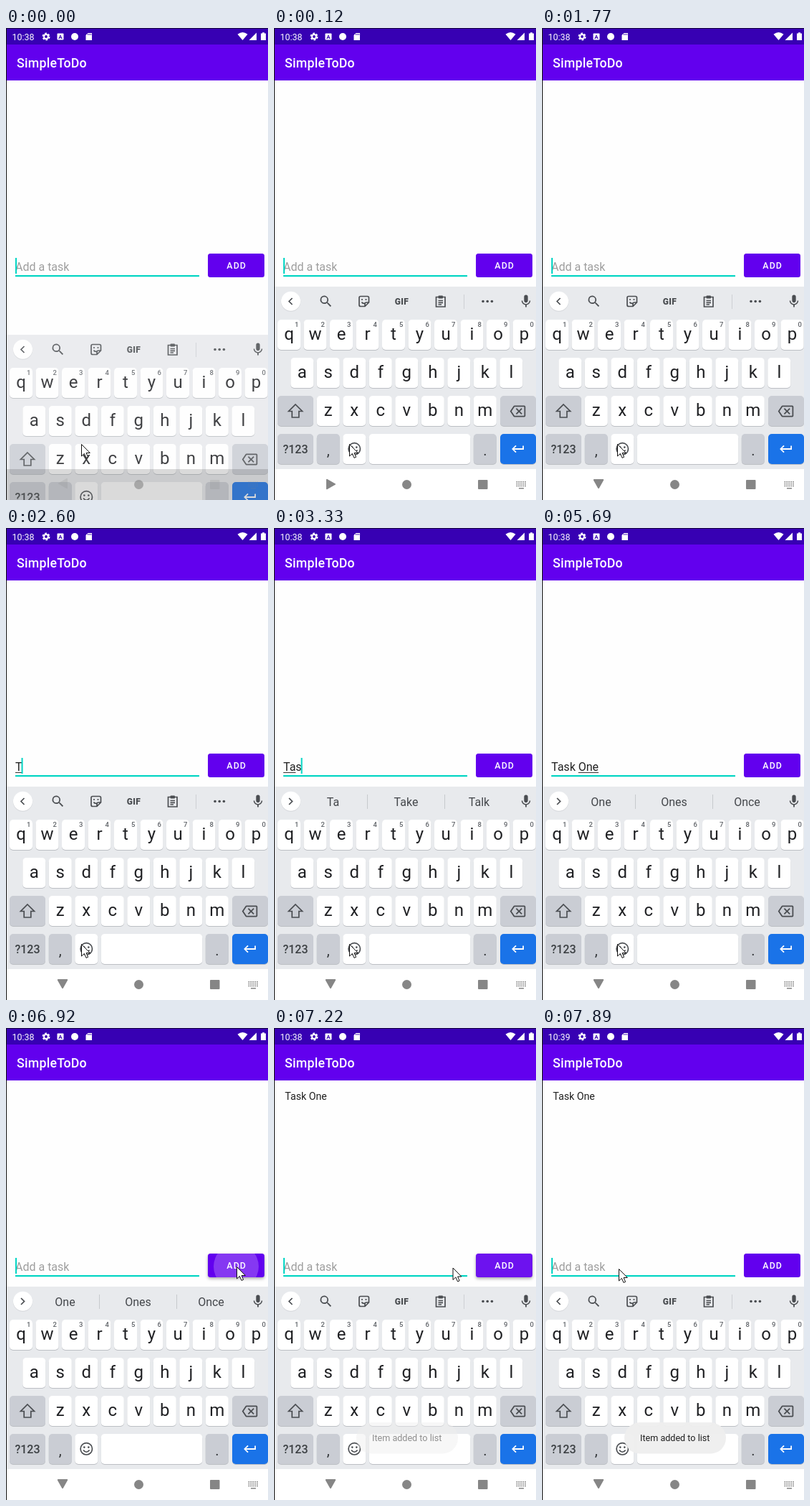
Write an HTML page that moves like this. It is 366 by 657 pixels and loops after 8 s.

```html
<!DOCTYPE html>
<html lang="en">
<head>
<meta charset="utf-8">
<title>SimpleToDo</title>
<style>
html, body { margin: 0; width: 100%; height: 100%; overflow: hidden; background: #fefefe; }
svg { display: block; width: 366px; height: 657px; font-family: Roboto, "Noto Sans", sans-serif; }
text { white-space: pre; }
.line { fill: none; stroke: #4a4d51; stroke-width: 1.7; }
</style>
</head>
<body>
<svg id="stage" viewBox="0 0 366 657"></svg>
<script>
const LOOP = 8000, TEAL = '#03d5c4', GREY = '#4a4d51';
const stage = document.getElementById('stage');

const rect = (x, y, w, h, fill, r = 0, more = '') =>
  `<rect x="${x}" y="${y}" width="${w}" height="${h}" rx="${r}" fill="${fill}" ${more}/>`;
const circle = (x, y, r, fill, more = '') => `<circle cx="${x}" cy="${y}" r="${r}" fill="${fill}" ${more}/>`;
const text = (x, y, size, fill, str, more = '') =>
  `<text x="${x}" y="${y}" font-size="${size}" fill="${fill}" ${more}>${str}</text>`;
const path = (d, fill, more = '') => `<path d="${d}" fill="${fill}" ${more}/>`;
const line = (d, more = '') => `<path class="line" d="${d}" ${more}/>`;
const icon = (x, y, scale, d, fill) =>
  path(d, fill, `transform="translate(${x} ${y}) scale(${scale}) translate(-12 -12)"`);
const group = (id, body, more = '') => `<g id="${id}" ${more}>${body}</g>`;
const MID = 'text-anchor="middle"', BOLD = 'font-weight="500"';

const SEARCH = 'M15.5 14h-.79l-.28-.27A6.5 6.5 0 1 0 9.5 16c1.61 0 3.09-.59 4.23-1.57l.27.28v.79l5 5L20.49 19zm-6 0a4.5 4.5 0 1 1 0-9 4.5 4.5 0 0 1 0 9z';
const MIC = 'M12 14c1.66 0 3-1.34 3-3V5a3 3 0 0 0-6 0v6c0 1.66 1.34 3 3 3zm5.3-3c0 3-2.54 5.1-5.3 5.1S6.7 14 6.7 11H5c0 3.41 2.72 6.23 6 6.72V21h2v-3.28c3.28-.48 6-3.3 6-6.72z';
const RETURN = 'M19 7v4H5.83l3.58-3.59L8 6l-6 6 6 6 1.41-1.41L5.83 13H21V7z';
const ERASE = 'M22 3H7c-.69 0-1.23.35-1.59.88L0 12l5.41 8.11c.36.53.9.89 1.59.89h15a2 2 0 0 0 2-2V5a2 2 0 0 0-2-2zm0 16H7.07L2.4 12l4.66-7H22zm-11.59-2L14 13.41 17.59 17 19 15.59 15.41 12 19 8.41 17.59 7 14 10.59 10.41 7 9 8.41 12.59 12 9 15.59z';

function statusBar() {
  return rect(0, 0, 366, 23, '#3700b3') +
    text(8.5, 17, 12.4, '#fff', '10:38', 'id="clock"') +
    circle(56, 12, 2.9, 'none', 'stroke="#fff" stroke-width="2"') +
    circle(56, 12, 4.5, 'none', 'stroke="#fff" stroke-width="2" stroke-dasharray="2.7 2.01"') +
    rect(71.5, 7.5, 9, 9, '#fff', 1) + text(76, 15, 8, '#3700b3', 'A', MID + ' font-weight="700"') +
    circle(96, 12, 5, '#fff') +
    path('M114.5 7H120V17H111.5V10Z', '#fff') +
    path('M114.6 8v2m2-2v2m2-2v2', 'none', 'stroke="#3700b3" stroke-width=".9"') +
    path('M323.500 8.700Q330.500 3.500 337.500 8.700L330.500 17Z', '#fff') +
    path('M350 6.500V17H339.500Z', '#fff') +
    path('M356 7.500H358V6.200H361V7.500H363V17H356Z', '#fff');
}

function key(x, y, w, fill, label = '') {
  return rect(x, y + 1, w, 42, '#bcbfc4', 5) + rect(x, y, w, 42, fill, 5) + label;
}

function letters(str, x0, y, digits) {
  return [...str].map((c, i) => {
    const x = x0 + 36.5 * i;
    return key(x, y, 32, '#fff', text(x + 16, y + 27.5, 24, '#202124', c, MID) +
      (digits ? text(x + 26.7, y + 10, 9.5, '#5f6368', (i + 1) % 10, MID + ' ' + BOLD) : ''));
  }).join('');
}

function keyboard() {
  const dark = '#cacdd4';
  const tools = icon(72.5, 380.5, .889, SEARCH, GREY) +
    line('M121 373.500H130.500Q132.500 373.500 132.500 375.500V382L127 387.500H121Q119 387.500 119 385.500V375.500Q119 373.500 121 373.500ZM132.500 382H129Q127 382 127 384V387.500M122.500 381.500Q124 384 126.500 383') +
    circle(123, 378, 1.1, GREY) + circle(128.500, 378, 1.1, GREY) +
    text(178.500, 384.500, 12, GREY, 'GIF', MID + ' font-weight="900" letter-spacing=".4"') +
    line('M226.500 374.500H239V388H226.500ZM229.500 379.500H236M229.500 382.300H236M229.500 385H234') +
    rect(229.500, 372.500, 6.500, 4, GREY, 1) +
    rect(265, 371, 1, 20, '#cdd0d4') +
    [292, 298.2, 304.4].map(x => circle(x, 380.500, 1.8, GREY)).join('') +
    line('M25.500 376L21 380.500L25.500 385');
  const words = [82.5, 184.5, 286.5].map(x => text(x, 386.500, 16, '#44474b', '', MID + ' class="word"')).join('') +
    rect(130, 371, 1, 20, '#c6c9cd') + rect(238, 371, 1, 20, '#c6c9cd') +
    line('M21 376L25.500 380.500L21 385');
  return rect(0, 360, 366, 297, '#e8eaed') +
    circle(23.5, 381, 13.7, '#d4d6da') + circle(23.5, 380.3, 13.5, '#fff') +
    group('tools', tools) + group('words', words) + icon(352, 380.5, .889, MIC, GREY) +
    letters('qwertyuiop', 5, 406, true) + letters('asdfghjkl', 23.3, 459) + letters('zxcvbnm', 59.8, 512) +
    key(5, 512, 50, dark, line('M30 524L39.500 533.500H34.800V542H25.200V533.500H20.500Z')) +
    key(316, 512, 50, dark, icon(340.500, 533.500, .9, ERASE, GREY)) +
    key(5, 565, 50, dark, text(30, 591.500, 16, '#3c4043', '?123', MID + ' ' + BOLD)) +
    key(59.8, 565, 32, dark, text(75.8, 595, 20, '#303336', ',', MID)) +
    key(96.3, 565, 32, '#fff', circle(112.300, 585.800, 8.200, 'none', 'class="line"') +
      circle(109.300, 583.600, 1.3, GREY) + circle(115.300, 583.600, 1.3, GREY) +
      line('M108 587.500Q112.300 593 116.600 587.500')) +
    key(132.8, 565, 141.5, '#fff') +
    key(278.8, 565, 32, dark, text(294.8, 595, 20, '#303336', '.', MID)) +
    key(316, 565, 50, '#1a73e8', icon(341, 586, .889, RETURN, '#fff'));
}

function navBar() {
  const c = '#868686';
  let dots = '';
  for (let i = 0; i < 15; i++) dots += rect(338.5 + i % 5 * 2.9, 631 + (i / 5 | 0) * 2.8, 1.7, 1.7, c);
  return rect(0, 614, 366, 43, '#fff', 0, 'id="navBack"') +
    circle(185.500, 635.500, 6.5, c, 'id="home"') +
    group('navIcons', path('M72.800 629H85.200L79 640Z', c, `id="back" stroke="${c}" stroke-width="2" stroke-linejoin="round"`) +
      rect(285, 629, 13.5, 13, c, 1) + dots + rect(342, 640, 7, 1.5, c));
}

stage.innerHTML =
  '<clipPath id="clip"><rect x="282" y="314" width="79" height="33" rx="3.500"/></clipPath>' +
  rect(0, 0, 366, 657, '#fefefe') + statusBar() +
  rect(0, 23, 366, 50, '#6200ee') +
  text(15, 54.8, 17.8, '#fff', 'SimpleToDo', BOLD + ' letter-spacing=".22"') +
  text(15.3, 100, 14.2, '#212121', 'Task One', 'id="item"') +
  rect(13, 344, 257, 2.2, TEAL) +
  text(13, 337.5, 16, '#9e9e9e', 'Add a task', 'id="hint"') +
  text(13, 337.5, 16, '#212121', '', 'id="field"') +
  rect(13, 340, 0, 1, '#333', 0, 'id="under"') + rect(13, 320, 2, 22, TEAL, 0, 'id="caret"') +
  rect(282, 314, 79, 33, '#6200ee', 3.5, 'id="button"') +
  group('ripple', circle(321.500, 332, 10, '#fff'), 'clip-path="url(#clip)"') +
  text(308.3, 335, 12.4, '#fff', 'ADD', BOLD + ' letter-spacing="1.1"') +
  group('keys', keyboard()) + navBar() +
  group('toast', rect(115, 549, 142, 43.5, '#efefef', 21.7, 'opacity=".95"') + text(137, 575.3, 12.6, '#202020', 'Item added to list')) +
  path('M0 0V16.500L3.900 12.900L6.500 18.900L9.100 17.800L6.600 12H11.800Z', '#fff', 'id="mouse" stroke="#111" stroke-width="1"') +
  rect(0, 0, 1, 657, '#111') + rect(0, 0, 366, 1, '#1a0a40');

// Each step lists only what changes at that time; "from"/"to" are the underlined letters.
const steps = [
  [0, { slide: 67, turn: 90, caret: 1, text: '', from: 0, to: 0, words: '', mouse: [105.5, 579.5], ripple: 0, glow: 0, toast: 0, item: 0, clock: '10:38' }],
  [120, { slide: 0, turn: -90 }],
  [240, { turn: 0, caret: 0 }],
  [800, { caret: 1 }],
  [1230, { caret: 0 }],
  [1770, { caret: 1 }],
  [2230, { caret: 0 }],
  [2400, { text: 'T', caret: 1 }],
  [2570, { to: 1 }],
  [2750, { words: 'T The This' }],
  [3050, { text: 'Ta' }],
  [3330, { text: 'Tas', to: 2, words: 'Ta Take Talk' }],
  [3600, { to: 3, words: 'Tas Task Taste' }],
  [4030, { text: 'Task' }],
  [4160, { to: 4, words: 'Task Tasks Tasked' }],
  [4440, { text: 'Task ', from: 5, to: 5, words: '2 one for' }],
  [4560, { text: 'Task O' }],
  [4700, { to: 6, words: 'O One Of' }],
  [4840, { text: 'Task On' }],
  [4980, { text: 'Task One', to: 7, words: 'On One Only' }],
  [5260, { to: 8, words: 'One Ones Once' }],
  [5690, { caret: 0 }],
  [5960, { mouse: [145, 530] }],
  [6080, { mouse: [220, 435] }],
  [6200, { mouse: [285, 360], caret: 1 }],
  [6470, { mouse: [318, 336] }],
  [6610, { mouse: [322.5, 332.5] }],
  [6750, { ripple: 16, glow: .22, text: '', from: 0, to: 0 }],
  [6920, { ripple: 31.5, glow: .22 }],
  [7070, { ripple: 44, glow: .16, words: '', item: 1 }],
  [7200, { ripple: 50, glow: .07, toast: .5, mouse: [250, 334] }],
  [7330, { ripple: 0, glow: 0, toast: .85, mouse: [150, 338] }],
  [7460, { toast: 1, mouse: [110, 338], caret: 0 }],
  [7610, { mouse: [107.5, 335.5] }],
  [7890, { caret: 1, clock: '10:39' }]
];
let last = {};
const states = steps.map(([at, change]) => last = { ...last, ...change, at });

const $ = id => document.getElementById(id);
const set = (id, props) => { for (const k in props) $(id).setAttribute(k, props[k]); };
const show = (id, on) => set(id, { opacity: +on });
const wordNodes = document.querySelectorAll('.word');
const pen = document.createElement('canvas').getContext('2d');
pen.font = '16px Roboto, "Noto Sans", sans-serif';
const endOf = (str, n) => 13 + pen.measureText(str.slice(0, n)).width;

function draw(s) {
  const sliding = s.slide > 0, x = endOf(s.text, s.from);
  set('keys', { transform: `translate(0 ${s.slide})`, opacity: sliding ? .85 : 1 });
  set('navBack', { fill: sliding ? '#000' : '#fff', opacity: sliding ? .14 : 1 });
  show('home', sliding ? .6 : 1);
  show('navIcons', sliding ? .18 : 1);
  set('back', { transform: `rotate(${s.turn} 79.500 634.500)` });
  $('field').textContent = s.text;
  show('hint', !s.text);
  set('under', { x, width: endOf(s.text, s.to) - x });
  set('caret', { x: s.text ? endOf(s.text) - 1 : 13, opacity: s.caret });
  show('tools', !s.words);
  show('words', !!s.words);
  s.words.split(' ').forEach((w, i) => wordNodes[i].textContent = w);
  show('item', s.item);
  show('toast', s.toast);
  $('clock').textContent = s.clock;
  show('ripple', s.glow);
  $('ripple').firstChild.setAttribute('r', s.ripple);
  $('button').style.filter = s.glow ? 'drop-shadow(0 2px 2px #0005)' : 'drop-shadow(0 .5px .5px #0003)';
  set('mouse', { transform: `translate(${s.mouse})` });
}

let shown;
function tick(now) {
  const t = now % LOOP, s = states.filter(st => st.at <= t).pop() || states[0];
  if (s !== shown) draw(shown = s);
  requestAnimationFrame(tick);
}
draw(states[0]);
requestAnimationFrame(tick);
</script>
</body>
</html>
```
